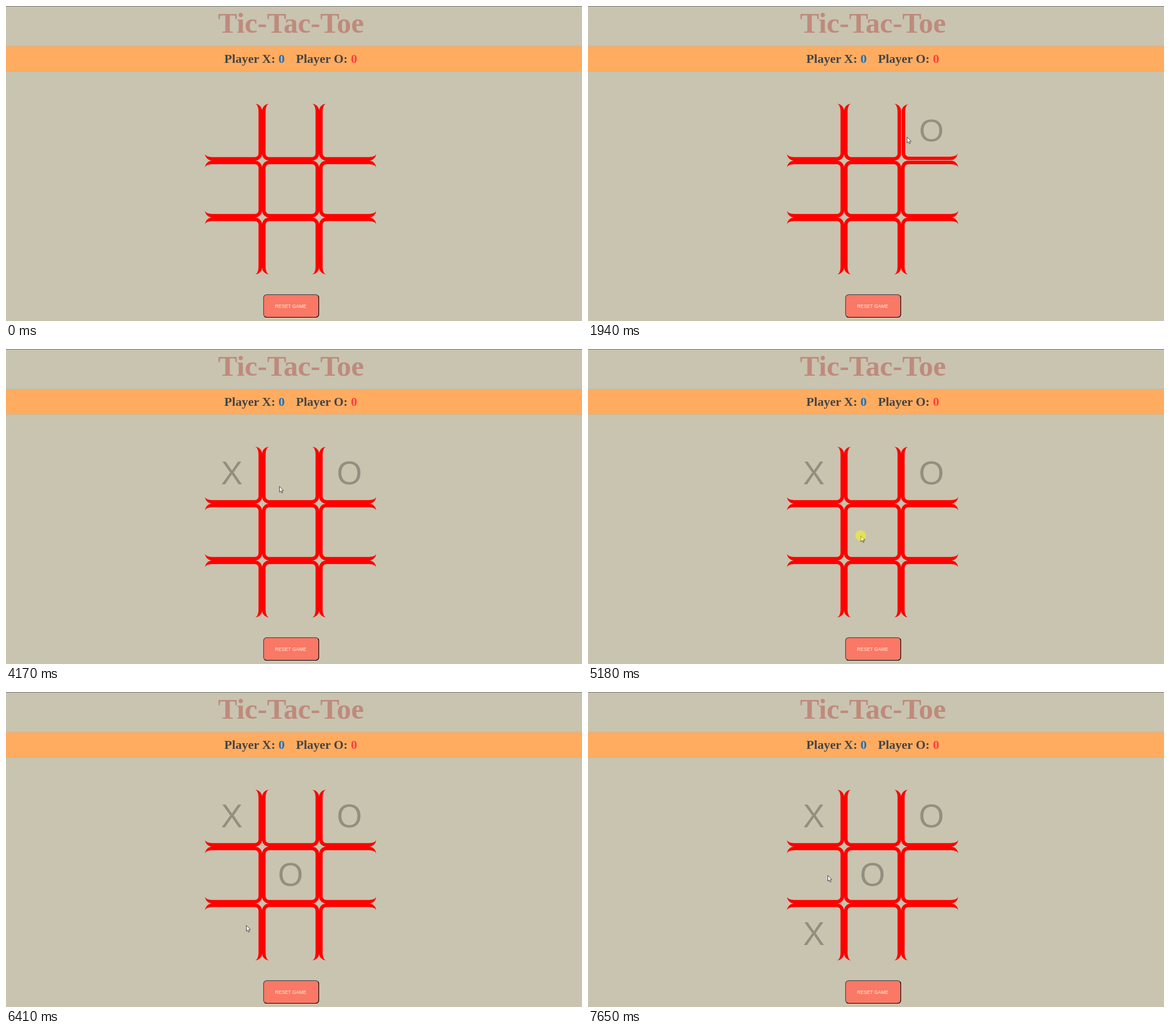
Write an HTML page that moves like this. It is 1010 px wide and 554 px high and loops after 8000 ms.

```html
<!DOCTYPE html>
<html lang="en">
<head>
<meta charset="utf-8">
<title>Tic-Tac-Toe</title>
<style>
  html, body { margin: 0; width: 100%; height: 100%; overflow: hidden; background: #c8c4b0; }
  body { position: relative; }
  .bar { position: absolute; left: 0; top: 70.6px; width: 100%; height: 44.8px; background: #ffac60; box-shadow: 0 0 2px rgba(120, 110, 80, .3); }
  .edge { position: absolute; left: 0; top: 0; width: 100%; height: 1px; background: #77756c; }
  svg { position: absolute; left: 0; top: 0; }
  .serif { font-family: "Liberation Serif", "Times New Roman", serif; font-weight: bold; text-anchor: middle; }
  .label { font-family: "Liberation Sans", Arial, sans-serif; font-size: 8.4px; text-anchor: middle; fill: #fff0d8; }
  #grid, .reset { position: absolute; transform: scale(.625); transform-origin: 0 0; box-sizing: border-box; }
  #grid { left: 349.3px; top: 172px; width: 480px; height: 480px; }
  .cell {
    position: absolute; width: 160px; height: 160px; box-sizing: border-box;
    border: 0 solid #f00; border-radius: 20px;
    display: flex; align-items: center; justify-content: center;
    font: 91px/1 "Liberation Sans", Arial, sans-serif; color: rgba(0, 0, 0, .27);
  }
  .cell span { position: relative; top: -1px; }
  .reset {
    left: 450.6px; top: 507px; width: 157px; height: 66px;
    background: #f97866; border: 2px solid; border-color: #4c4c4c #000 #000 #4c4c4c; border-radius: 10px;
  }
</style>
</head>
<body>
<div class="edge"></div>
<div class="bar"></div>
<div class="reset"></div>
<div id="grid"></div>
<svg width="1010" height="554" viewBox="0 0 1010 554">
  <text class="serif" x="499.7" y="46.7" font-size="50.4" fill="#bf8a7c">Tic-Tac-Toe</text>
  <g class="serif" font-size="22" fill="#444">
    <text x="435.8" y="100">Player X: <tspan fill="#1872c0">0</tspan></text>
    <text x="562.1" y="100">Player O: <tspan fill="#ff3f3f">0</tspan></text>
  </g>
  <text class="label" x="499.2" y="530.7">RESET GAME</text>
  <g id="cursor">
    <path d="M.5 .6V10.7L2.8 8.6L4.4 12.3L6.1 11.6L4.5 8H7.7Z" fill="#fff" stroke="#222" stroke-width=".8"/>
    <circle id="press" r="9.3" fill="#ff0" fill-opacity=".47"/>
  </g>
</svg>
<script>
const LOOP = 8000, STEP = 70, POP = 300;

// The pointer enters from the corner and glides from stop to stop;
// bend is how far the path bows sideways.
const entry = { x: 1010, y: 554 };
const stops = [
  { from: 330, to: 460, x: 515, y: 377, bend: 0 },
  { from: 720, to: 1280, x: 559, y: 230, bend: -112 },
  { from: 2210, to: 2480, x: 371, y: 233, bend: -15 },
  { from: 3560, to: 4170, x: 479, y: 241, bend: 0 },
  { from: 4500, to: 4920, x: 478, y: 328, bend: 40 },
  { from: 5590, to: 6150, x: 467, y: 375, bend: -70 },
  { from: 6220, to: 6550, x: 415, y: 414, bend: 0 },
  { from: 7020, to: 7650, x: 420, y: 322, bend: 22 }
];

// lead: how far the pop has run when it is first seen
const clicks = [
  { down: 1610, up: 1810, cell: 2, mark: "O", lead: 100 },
  { down: 3090, up: 3350, cell: 0, mark: "X", lead: 70 },
  { down: 5180, up: 5380, cell: 4, mark: "O", lead: 70 },
  { down: 6750, up: 7020, cell: 6, mark: "X", lead: 70 }
];

const $ = id => document.getElementById(id);
const cursor = $("cursor"), press = $("press");
const show = (el, on) => { el.style.display = on ? "" : "none"; };

const cells = Array.from({ length: 9 }, (_, i) => {
  const col = i % 3, row = (i - col) / 3;
  const cell = document.createElement("div");
  const side = on => on ? "10px" : "0";
  cell.className = "cell";
  cell.style.left = col * 160 + "px";
  cell.style.top = row * 160 + "px";
  cell.style.borderWidth = [row > 0, col < 2, row < 2, col > 0].map(side).join(" ");
  cell.append(document.createElement("span"));
  $("grid").append(cell);
  return cell;
});

function cursorAt(t) {
  const i = stops.findLastIndex(s => t >= s.from);
  if (i < 0) return null;
  const a = stops[i - 1] || entry, b = stops[i];
  const n = Math.round((b.to - b.from) / STEP);
  const k = Math.floor((t - b.from) / (b.to - b.from) * n + .15);
  const left = 1 - Math.min(1, (k + 1) / (n + 1));
  const u = 1 - left * left;
  const dx = b.x - a.x, dy = b.y - a.y;
  const bow = b.bend * 4 * u * (1 - u) / Math.hypot(dx, dy);
  return [a.x + dx * u - dy * bow, a.y + dy * u + dx * bow];
}

function drawCell({ up, cell, mark, lead }, t) {
  const { style, firstChild } = cells[cell];
  const age = t < up ? POP : lead + STEP * Math.floor((t - up) / STEP + .15);
  const left = Math.max(0, 1 - age / POP) ** 2;
  firstChild.textContent = t < up ? "" : mark;
  style.transform = left ? `scale(${1 - .5 * left})` : "none";
  style.opacity = 1 - .7 * left;
}

function draw(t) {
  const pos = cursorAt(t);
  show(cursor, pos);
  if (pos) cursor.setAttribute("transform", `translate(${pos.map(Math.round)})`);
  show(press, clicks.some(c => t >= c.down && t < c.up));
  clicks.forEach(c => drawCell(c, t));
}

const begin = performance.now();
function tick() {
  draw((performance.now() - begin) % LOOP);
  requestAnimationFrame(tick);
}
tick();
</script>
</body>
</html>
```
